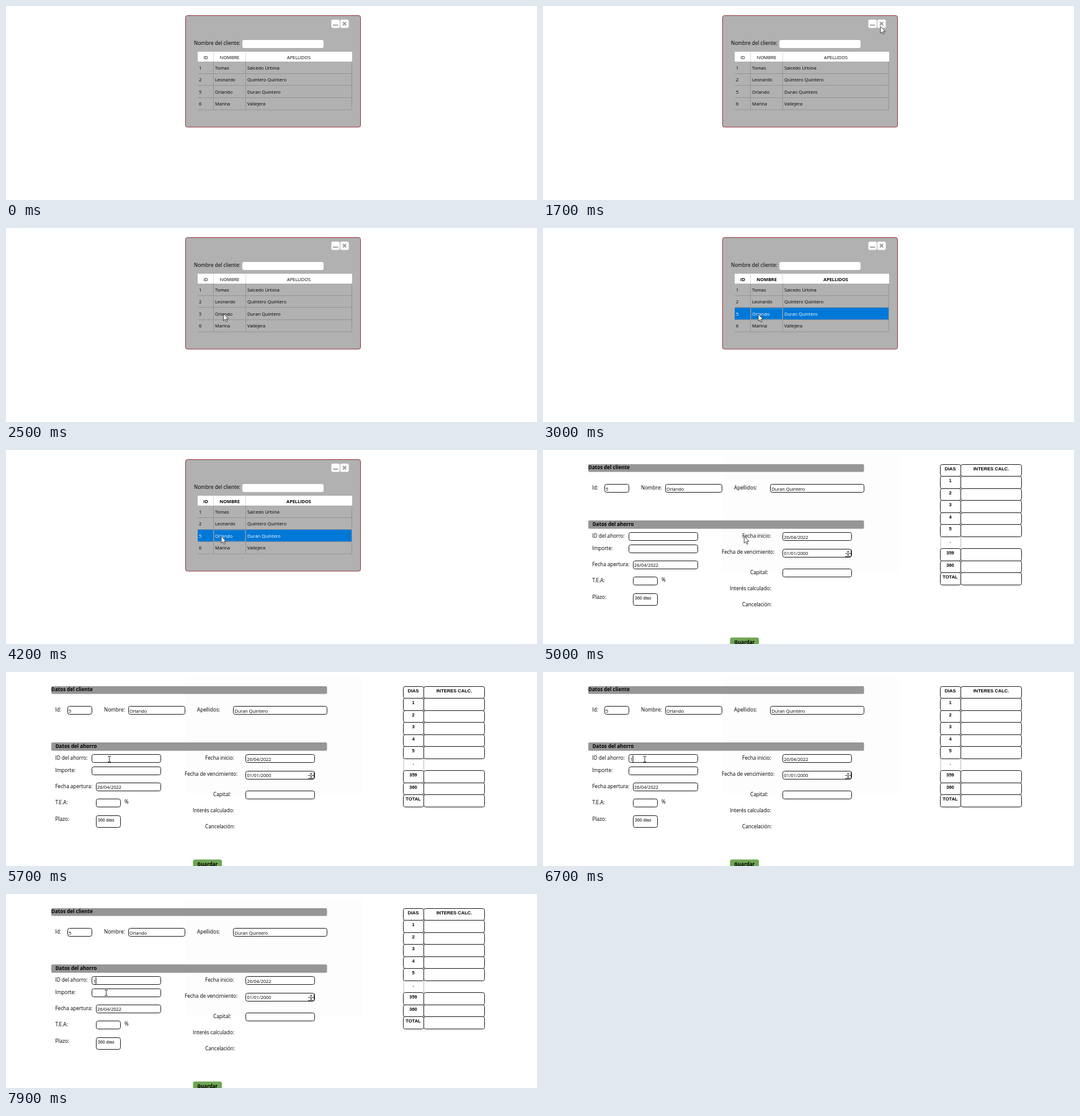
An HTML page that plays this animation: 856 by 314 pixels, repeating every 8 s.

```html
<!DOCTYPE html>
<html lang="es">
<head>
<meta charset="utf-8">
<style>
  html, body { margin: 0; width: 856px; height: 314px; overflow: hidden; background: #fff; }
  svg { display: block; }
  text { font: 7.35px "Open Sans", "Noto Sans", sans-serif; fill: #000; white-space: pre; }
  .label { font-size: 8.2px; }
  .title { font-size: 8px; font-weight: 700; }
  .mid { text-anchor: middle; }
  .bold { font-weight: 700; }
  .white { fill: #fff; }
  .arial { font: 700 7.5px "Liberation Sans", Arial, sans-serif; }
  .plain { font: 7px "Liberation Sans", Arial, sans-serif; }
  .field { fill: #fff; stroke: #222; }
</style>
</head>
<body>
<svg id="stage" width="856" height="314" viewBox="0 0 856 314"></svg>
<script>
const LOOP = 8000, STEP = 100;
const OPEN_FORM = 4300, SELECT = 3000, FOCUS = 5900, TYPE = 6700, BLINK = 500;
const stage = document.getElementById('stage');

function add(parent, tag, attrs, content) {
  const el = document.createElementNS('http://www.w3.org/2000/svg', tag);
  for (const key in attrs) el.setAttribute(key, attrs[key]);
  if (content !== undefined) el.textContent = content;
  return parent.appendChild(el);
}
const group = (parent = stage) => add(parent, 'g', {});
const text = (g, x, y, content, cls = '') => add(g, 'text', { x, y, class: cls }, content);
const rect = (g, x, y, width, height, fill, rx = 0) =>
  add(g, 'rect', { x, y, width, height, fill, rx });
const path = (g, d, stroke, width = 1, fill = 'none') =>
  add(g, 'path', { d, stroke, fill, 'stroke-width': width });
const field = (g, x, y, width, height = 13) =>
  add(g, 'rect', { x: x + .5, y: y + .5, width, height, rx: 3, class: 'field' });
const show = (el, visible) => el.setAttribute('visibility', visible ? 'visible' : 'hidden');

const clients = [
  ['1', 'Tomas', 'Salcedo Urbina'],
  ['2', 'Leonardo', 'Quintero Quintero'],
  ['5', 'Orlando', 'Duran Quintero'],
  ['6', 'Marina', 'Vallejera']
];
const chosen = 2;
const columns = [311, 337, 389];

// Client search window
const dialog = group();
rect(dialog, 289.5, 15.5, 282, 180.5, '#b1b1b1', 3).setAttribute('stroke', '#98363f');
rect(dialog, 524.5, 22, 13.5, 13.5, '#fff', 2.5);
rect(dialog, 539, 22, 13.5, 13.5, '#fff', 2.5);
rect(dialog, 527, 30, 8.5, 2, '#aaa');
path(dialog, 'M543 26l5.4 5.4m0-5.4l-5.4 5.4', '#999', 1.8);
text(dialog, 303, 63.3, 'Nombre del cliente:', 'label');
rect(dialog, 381, 55, 131, 13, '#fff', 3);
rect(dialog, 309, 74, 249, 16, '#fff');
path(dialog, 'M334.5 74v16M386.5 74v16', '#ddd');
const heads = [[322, 'ID'], [360.5, 'NOMBRE'], [472, 'APELLIDOS']]
  .map(([x, s]) => text(dialog, x, 85.6, s, 'mid'));
const rowTop = i => 90 + 19.6 * i;
const highlight = rect(dialog, 309, 129, 249, 19.5, '#0078d7');
path(dialog, 'M309 109.5h249M309 128.5h249M309 148.5h249M309 168h249M334.5 90v78M386.5 90v78M557.5 90v78', '#969696');
const focusCell = add(dialog, 'rect',
  { x: 335.5, y: 130, width: 50, height: 17.5, fill: 'none', stroke: '#5d92b8', 'stroke-width': .7 });
const rows = clients.map((client, i) =>
  client.map((s, c) => text(dialog, columns[c], rowTop(i) + 12.6, s)));

// Savings form, over a faint trace of the closed window
const form = group();
rect(form, 289, 10, 286, 187, '#fdfdfd');
rect(form, 73, 23, 444.5, 12.5, '#969696', 2);
rect(form, 73, 114, 444.5, 13.5, '#969696', 2);
text(form, 73, 31.3, 'Datos del cliente', 'title');
text(form, 79.7, 122.8, 'Datos del ahorro', 'title');
[
  [79.4, 64.3, 'Id:'], [158, 64.3, 'Nombre:'], [308, 64.3, 'Apellidos:'],
  [79.4, 142.3, 'ID del ahorro:'], [79.4, 162, 'Importe:'], [79.4, 188.2, 'Fecha apertura:'],
  [79.4, 213.8, 'T.E.A:'], [191, 213, '%'], [79.4, 240.5, 'Plazo:'],
  [321, 142.3, 'Fecha inicio:'], [288, 168, 'Fecha de vencimiento:'],
  [334, 201.2, 'Capital:'], [301, 227.2, 'Interés calculado:'], [321, 253.2, 'Cancelación:']
].forEach(([x, y, s]) => text(form, x, y, s, 'label'));
[
  [99, 55, 39], [197, 55, 91], [366, 55, 151],
  [138, 133, 111], [138, 153, 111], [145, 179, 104], [145, 205, 39], [145, 232, 39, 19],
  [386, 133, 111], [386, 160, 111], [386, 192, 111]
].forEach(box => field(form, ...box));
const [id, name, surname] = clients[chosen];
[
  [101, 65.5, id], [199, 65.5, name], [368.5, 65.5, surname],
  [147, 189.4, '26/04/2022'], [388.5, 143.6, '26/04/2022'], [388.5, 170.2, '01/01/2000']
].forEach(([x, y, s]) => text(form, x, y, s));
text(form, 148, 242, '360 dias', 'plain');
path(form, 'M487 167.5h9.5M496.5 162v10M487 172.5h9', '#444');
path(form, 'M490 165.5l1.8-2.2 1.8 2.2zM490 169.3l1.8 2.2 1.8-2.2z', 'none', 0, '#111');
rect(form, 301.5, 303.5, 46.5, 16, '#6fa653', 3);
text(form, 308.3, 314, 'Guardar', 'title');

// Interest table
const dayTop = i => Math.floor(23 + 19.5 * i);
['DIAS', 1, 2, 3, 4, 5, '.', 359, 360, 'TOTAL'].forEach((day, i) => {
  const y = dayTop(i), height = dayTop(i + 1) - y;
  if (day === '.') path(form, `M641 ${y}v${height}M673.5 ${y}v${height}`, '#bbb');
  else {
    field(form, 640, y, 33, height);
    field(form, 673, y, 98, height);
  }
  text(form, 656.5, y + 10, day, 'arial mid');
});
text(form, 722.5, 32.7, 'INTERES CALC.', 'arial mid');

const typed = text(form, 140.5, 143.6, '1');
const caret = rect(form, 140, 135, 1, 11, '#000');

const arrow = path(stage, 'M0 0v11.2l2.6-2.4 1.8 4.1 1.8-.8-1.8-3.9h3.5z', '#222', .8, '#fff');
const beam = path(stage, 'M-2.5-4.5h2l.5.5.5-.5h2M0-4v8M-2.5 4.5h2l.5-.5.5.5h2', '#222', .9);

// Pointer stops: time, x, y
const stops = [
  [1700, 544, 33], [1900, 395, 130], [2000, 395, 130], [2600, 347, 139.5],
  [4800, 347, 139.5], [5700, 166.5, 141], [6200, 164, 141], [7100, 164, 141], [7900, 161.5, 160]
];
function pointerAt(t) {
  const next = stops.findIndex(stop => stop[0] > t);
  if (next < 1) return stops[next < 0 ? stops.length - 1 : 0].slice(1);
  const [t0, x0, y0] = stops[next - 1], [t1, x1, y1] = stops[next];
  const p = (t - t0) / (t1 - t0), k = p * p * (3 - 2 * p);
  return [x0 + (x1 - x0) * k, y0 + (y1 - y0) * k];
}

function draw(now) {
  const t = Math.floor(now % LOOP / STEP) * STEP;
  const inForm = t >= OPEN_FORM, selected = t >= SELECT, hasText = t >= TYPE;
  dialog.style.display = inForm ? 'none' : '';
  form.style.display = inForm ? '' : 'none';

  show(highlight, selected);
  show(focusCell, selected);
  heads.forEach(h => h.setAttribute('class', selected ? 'mid bold' : 'mid'));
  rows[chosen].forEach(cell => cell.setAttribute('class', selected ? 'white' : ''));

  const sinceKey = t - (hasText ? TYPE : FOCUS);
  show(typed, hasText);
  show(caret, sinceKey >= 0 && Math.floor(sinceKey / BLINK) % 2 === 0);
  caret.setAttribute('x', hasText ? 144.5 : 140);

  const [x, y] = pointerAt(t);
  const overInput = inForm && x < 249;
  show(arrow, t >= stops[0][0] && !overInput);
  show(beam, overInput);
  for (const el of [arrow, beam]) el.setAttribute('transform', `translate(${x} ${y})`);
  requestAnimationFrame(() => draw(performance.now() - start));
}
const start = performance.now();
draw(0);
</script>
</body>
</html>
```
